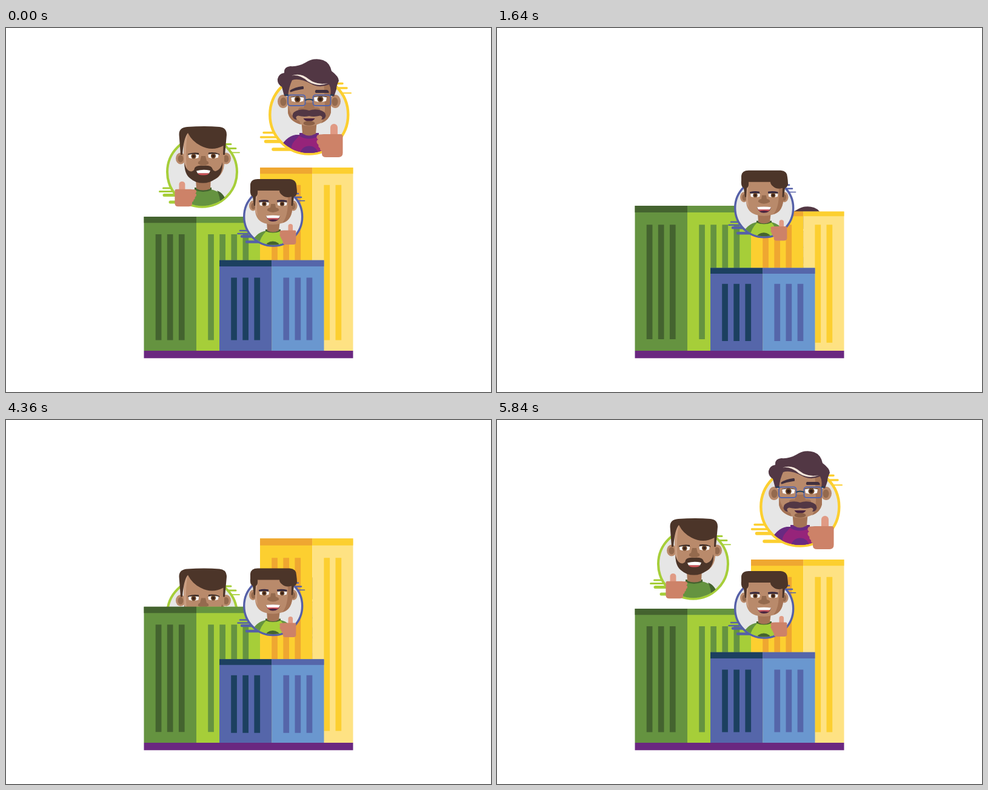
An HTML page for the animation above (5.96 s loop, 800 px wide and 600 px high).

```html
<!DOCTYPE html>
<html lang="en">
<head>
<meta charset="utf-8">
<title>Podium</title>
<style>
  html, body { margin: 0; width: 100%; height: 100%; overflow: hidden; background: #fff; }
  svg { display: block; width: 100vw; height: 100vh; }
</style>
</head>
<body>
<svg viewBox="0 0 800 600">
  <defs>
    <clipPath id="clipY"><circle cx="499.8" cy="143" r="63"/></clipPath>
    <clipPath id="clipG"><circle cx="323.5" cy="237.3" r="56"/></clipPath>
    <clipPath id="clipB"><circle cx="440.7" cy="311" r="46.5"/></clipPath>
    <g id="hand">
      <path fill="#e09a84" d="M23 22V6a6 6 0 0 1 12 0v16z"/>
      <path fill="#cd8268" d="M12 17H40q3.500 0 3.500 4V48q0 7-7 7H16q-7 0-7-6v-4q-3.500-1-3-5-3.500-2-2.500-5.500Q0 32 .5 28.500 1 26 3 26-1 23 1 19.500 2.500 17 7 17.500z"/>
    </g>
    <g id="eye">
      <path fill="#fff" d="M-10.500-3.500Q0-6 10.500-3.500L9.500 3Q0 6-9.500 3z"/>
      <circle r="5" fill="#70482a"/>
      <circle r="2.800" fill="#352019"/>
      <path fill="none" stroke="#4c3529" stroke-width="1" d="M-11-3.500Q0-6.500 11-3.500"/>
    </g>
  </defs>

  <path fill="#f5f5f5" d="M422 461.500h8v6.500h-8zM451 461.500h10v4.500h-10z"/>

  <g id="headY">
    <g fill="none" stroke="#fccf30" stroke-linecap="round">
      <path stroke-width="3.500" d="M425 172.500H442M420.500 180H446M543 91.500H555M545 99H562"/>
      <path stroke-width="2" d="M549 107.300H569"/>
      <path stroke-width="5.500" d="M428.500 187H455M441 200H470"/>
      <circle cx="499.800" cy="143" r="64.500" stroke-width="4.400" fill="#e6e6e6"/>
    </g>
    <g clip-path="url(#clipY)">
      <path fill="#692a81" d="M450 202Q460 179 478 176H522Q544 179 552 206V215H450z"/>
      <path fill="#96247a" d="M470 215Q468 194 476 186L485 176H515L526 188Q532 199 530 215z"/>
      <ellipse cx="500" cy="208" rx="15" ry="13.500" fill="#692a81"/>
    </g>
    <path fill="#692a81" d="M484 173H516V178Q500 187 484 178z"/>
    <path fill="#a47355" d="M487 150H513L511 174Q500 181 489 174z"/>
    <g fill="#b98a6b"><ellipse cx="457" cy="121" rx="9" ry="11"/><ellipse cx="543" cy="121" rx="9" ry="11"/></g>
    <g fill="#946a4e"><ellipse cx="457.500" cy="121.500" rx="5" ry="7"/><ellipse cx="542.500" cy="121.500" rx="5" ry="7"/></g>
    <path fill="#b98a6b" d="M464 82H536V139Q533 153 516 158Q500 165 484 158Q467 153 465 139z"/>
    <path fill="#a47355" d="M466 128Q469 148 484 153L486 159Q467 153 465 139zM524 82H536V139Q533 152 520 157Q527 146 526 128z"/>
    <path fill="#523744" d="M459 112L455 97Q447 92 448 84Q450 75 459 74Q458 64 469 63Q482 64 494 57Q508 48 523 53Q534 57 537 71Q549 80 549 87Q545 95 545 101L541 113L535 111Q537 100 533 93Q517 100 503 92Q484 82 472 86Q467 96 465 112z"/>
    <path fill="#f6e8dc" d="M471 78.500Q486 73 499 84Q513 95 531 91Q514 98 498 88Q484 76 471 78.500z"/>
    <path fill="#41303e" d="M468.500 103Q476 97.500 489 96Q491 95.500 491 98V100.500Q480 102 470 105.500Q468 106 468.500 103zM511 102H529Q533 103 532.500 107H511Q508.500 105 511 102z"/>
    <path fill="#a47355" d="M494 123H506L509 131Q518 130 518 135L509 139H491L482 135Q482 130 491 131z"/>
    <g class="eyes" data-y="117.600"><use href="#eye" x="480.800" y="117.600"/><use href="#eye" x="518.500" y="117.200"/></g>
    <g fill="none" stroke="#5566aa" stroke-width="2">
      <rect x="465" y="110.500" width="28.500" height="17.500" rx="4"/>
      <rect x="506.500" y="110.500" width="29" height="17.500" rx="4"/>
      <path stroke="#1c4060" d="M493.500 119Q500 116 506.500 119M460 110.500H466M535 110.500H540"/>
    </g>
    <path fill="#523744" d="M500 136Q508 133 517 135Q528 138 527.500 145Q526 151 520 151Q524 146 518 144.500Q509 147 500 145Q491 147 482 144.500Q476 146 480 151Q474 151 472.500 145Q472 138 483 135Q492 133 500 136z"/>
    <path fill="#49243f" d="M490.500 149H509.500Q507 154 500 154Q493 154 490.500 149z"/>
    <ellipse cx="500" cy="157" rx="9.500" ry="3.800" fill="#8b6047"/>
    <g class="thumb"><use href="#hand" transform="translate(512 158)"/></g>
  </g>
  <g id="blockY"></g>

  <g id="headG">
    <g fill="none" stroke="#a6ce39" stroke-linecap="round">
      <path stroke-width="3" d="M259.500 264H275M253.500 269.500H277M362 191.500H371M365 198.500H379"/>
      <path stroke-width="1.800" d="M368 205.300H385"/>
      <path stroke-width="5" d="M261 275.500H283M271 287H294"/>
      <circle cx="323.500" cy="237.300" r="57.500" stroke-width="4" fill="#e6e6e6"/>
    </g>
    <g clip-path="url(#clipG)">
      <path fill="#659340" d="M285 300Q290 270 312 266H338Q360 270 368 300z"/>
      <path fill="#44632f" d="M348 268Q362 272 368 300H353Q355 280 348 268z"/>
    </g>
    <path fill="#44632f" d="M311 263H339V267Q325 273 311 267z"/>
    <path fill="#a47355" d="M313 248H338L337 265Q325 270 314 265z"/>
    <g fill="#b98a6b"><ellipse cx="288" cy="215" rx="8" ry="9.500"/><ellipse cx="363" cy="215" rx="8" ry="9.500"/></g>
    <g fill="#946a4e"><ellipse cx="288" cy="215.500" rx="4.500" ry="6"/><ellipse cx="363" cy="215.500" rx="4.500" ry="6"/></g>
    <path fill="#b98a6b" d="M292 172H360V225Q357 253 326 253Q297 253 294 225z"/>
    <path fill="#ca9f83" d="M292 174H300Q295 195 298 232L294 227z"/>
    <path fill="#4c3529" d="M288 209L285.500 176Q285 164 299 163Q328 161 352 163Q364 164 364 176L361 209L358 209L358.500 194Q340 204 321 194Q307 187 300 173Q293 181 291 209z"/>
    <path fill="#4c3529" d="M294.500 222Q297 236 306 236.500Q311 235 311 231Q314 226 325.500 227Q339 226 340.500 232Q342 236 346 236Q355 233 357 221Q358 242 345 249Q335 256 325 255.500Q313 256 304 248Q294 241 294.500 222z"/>
    <path fill="#fff" d="M314 235.500Q325 232.500 337 235L335 239.500H316z"/>
    <path fill="#d4565c" d="M316 239.500H335Q333 243 325.500 242.500Q318 243 316 239.500z"/>
    <path fill="#352825" d="M300 207.500Q309 204.500 318 206V208.500Q308 208 300 209.500zM334 205.500Q344 204 352 207.500V209.500Q343 207.500 334 208z"/>
    <path fill="#946a4e" d="M322 211H329L331 219Q335 220 334 224Q325 229 317 224Q316 220 320 219z"/>
    <g class="eyes" data-y="211.500"><use href="#eye" transform="translate(309.500 211.500) scale(.83)"/><use href="#eye" transform="translate(342 211) scale(.83)"/></g>
    <g class="thumb"><use href="#hand" transform="translate(314.500 253) scale(-.83 .75)"/></g>
  </g>
  <g id="blockG"></g>

  <g id="headB">
    <g fill="none" stroke="#5560a8" stroke-linecap="round">
      <path stroke-width="2.600" d="M386 334H402M382.500 339H402M474 273H482M477 279H487"/>
      <path stroke-width="1.600" d="M480 284.700H492.500"/>
      <path stroke-width="4.500" d="M389 343.500H408M397 352.500H416"/>
      <circle cx="440.700" cy="311" r="48" stroke-width="3.400" fill="#e6e6e6"/>
    </g>
    <g clip-path="url(#clipB)">
      <path fill="#659340" d="M402 362Q409 337 430 334H452Q472 338 478 362z"/>
      <path fill="#a6ce39" d="M417 362Q417 347 430 334H452Q463 346 464 362z"/>
      <ellipse cx="440" cy="361" rx="12" ry="9.500" fill="#44632f"/>
    </g>
    <path fill="#44632f" d="M428 332H453V335Q440 340 428 335z"/>
    <path fill="#a47355" d="M430 318H452L450 334Q440 339 431 334z"/>
    <g fill="#b98a6b"><ellipse cx="407.500" cy="293" rx="6.500" ry="8.500"/><ellipse cx="474" cy="293" rx="6.500" ry="8.500"/></g>
    <g fill="#946a4e"><ellipse cx="408" cy="293.500" rx="3.600" ry="5.500"/><ellipse cx="473.500" cy="293.500" rx="3.600" ry="5.500"/></g>
    <path fill="#b98a6b" d="M410 264H472V300Q470 319 454 322Q440 326 427 322Q413 318 411 302z"/>
    <path fill="#ca9f83" d="M411 270H416Q412 286 415 310L411 302z"/>
    <path fill="#a47355" d="M464 268H472V300Q470 317 456 321Q468 308 464 268z"/>
    <path fill="#4c3529" d="M409 293L407 278Q402 276 403 266V258Q404 249 415 249H468Q479 250 479 260Q480 267 480 272Q479 277 475 278L473 293L470.500 293L471 278Q461 281 455 275Q451 272 451 268H415Q416 276 412 278L411 293z"/>
    <path fill="#33273f" d="M417 284.500Q425 282.500 433 284V286.500H417zM447 284Q455 282.500 463.500 284.500V286.500H447z"/>
    <path fill="#946a4e" d="M437 290H444L445 296Q451 297 450 301Q440 307 431 301Q430 297 436 296z"/>
    <g class="eyes" data-y="290"><use href="#eye" transform="translate(426 290) scale(.76)"/><use href="#eye" transform="translate(455.500 290) scale(.76)"/></g>
    <path fill="#49243f" d="M429 310Q440 308 452 310Q450 319 440 319Q432 319 429 310z"/>
    <path fill="#fff" d="M429 309.500Q440 308 452 309.500L450 313.500H431z"/>
    <path fill="#d4565c" d="M431 313.500H450L448 316Q440 314.500 433 316z"/>
    <g class="thumb"><use href="#hand" transform="translate(451 323) scale(.63 .62)"/></g>
  </g>
  <g id="blockB"></g>

  <rect id="base" x="227.500" y="532" width="345" height="12.300" fill="#6a2880"/>
</svg>
<script>
const FLOOR = 532, LOOP = 5960, STEP = 40;
const $ = id => document.getElementById(id);

// One face of a block: wall, lid and a row of stripes.
const face = (x, width, top, stripeTop, count, wall, trim) => {
  let d = `M${x} ${top}h${width}v10.300h${-width}z`;
  for (let i = 0; i < count; i++)
    d += `M${x + 19.2 + 19.1 * i} ${stripeTop}h9.700V514.500h-9.700z`;
  return `<rect x="${x}" y="${top}" width="${width}" height="${FLOOR - top}" fill="${wall}"/>` +
    `<path d="${d}" fill="${trim}"/>`;
};

$('blockY').innerHTML = face(419, 86.3, 230, 258.7, 3, '#fccf30', '#efa731') +
  face(505.2, 67.3, 230, 258.7, 2, '#fee283', '#fccf30');
$('blockG').innerHTML = face(227.5, 86.5, 311, 340, 3, '#659340', '#44632f') +
  face(314, 105, 311, 340, 4, '#a6ce39', '#659340');
$('blockB').innerHTML = face(352, 86.3, 382.8, 411.5, 3, '#5566aa', '#1c4060') +
  face(438.2, 86.3, 382.8, 411.5, 3, '#6a97cf', '#5566aa');

// Eased interpolation through [time, value] pairs.
const track = (keys, t) => {
  if (t <= keys[0][0]) return keys[0][1];
  for (let i = 1; i < keys.length; i++) {
    const [t0, a] = keys[i - 1], [t1, b] = keys[i];
    if (t < t1) {
      const p = (t - t0) / (t1 - t0);
      return a + (b - a) * p * p * (3 - 2 * p);
    }
  }
  return keys[keys.length - 1][1];
};

const HEAD_START = 490;
const baseKeys = [[0, 0], [200, 1.154], [340, .95], [470, 1]];
const headKeys = [[HEAD_START, 1], [740, -.125], [950, .088], [1110, -.05], [1280, 0]];
const thumbKeys = [[HEAD_START, 0], [740, 9], [1080, -8], [1400, 3], [1700, 0]];
const blinkKeys = [[1840, 1], [1920, .1], [2000, 1]];
const blockKeys = dip => [[440, 0], [570, 1.134], [760, dip], [1120, 1]];

const people = [
  { id: 'Y', blockDelay: 280, headDelay: 290, travel: 248, dip: .935 },
  { id: 'G', blockDelay: 170, headDelay: 210, travel: 245, dip: .912 },
  { id: 'B', blockDelay: 0, headDelay: 0, travel: 172, dip: .912 }
].map(p => {
  const head = $('head' + p.id);
  return { ...p, head, block: $('block' + p.id), keys: blockKeys(p.dip),
    eyes: head.querySelector('.eyes'), thumb: head.querySelector('.thumb') };
});

const move = (el, y) => el.setAttribute('transform', `translate(0 ${y})`);
const stretchY = (el, y, k) => el.setAttribute('transform', `translate(0 ${y * (1 - k)}) scale(1 ${k})`);

function draw(now) {
  const t = Math.floor((now % LOOP) / STEP) * STEP;
  // The scene collapses, rests, then builds up along the same path.
  const v = t < 2980 ? Math.max(0, 2440 - t) : Math.max(0, t - 3520);
  const k = track(baseKeys, v);
  $('base').setAttribute('transform', `translate(${400 * (1 - k)} 0) scale(${k} 1)`);
  for (const p of people) {
    const h = v - p.headDelay;
    stretchY(p.block, FLOOR, track(p.keys, v - p.blockDelay));
    p.head.setAttribute('visibility', h >= HEAD_START ? 'visible' : 'hidden');
    move(p.head, p.travel * track(headKeys, h));
    move(p.thumb, track(thumbKeys, h));
    stretchY(p.eyes, +p.eyes.dataset.y, track(blinkKeys, v));
  }
}

function tick() {
  draw(performance.now());
  requestAnimationFrame(tick);
}
tick();
</script>
</body>
</html>
```
